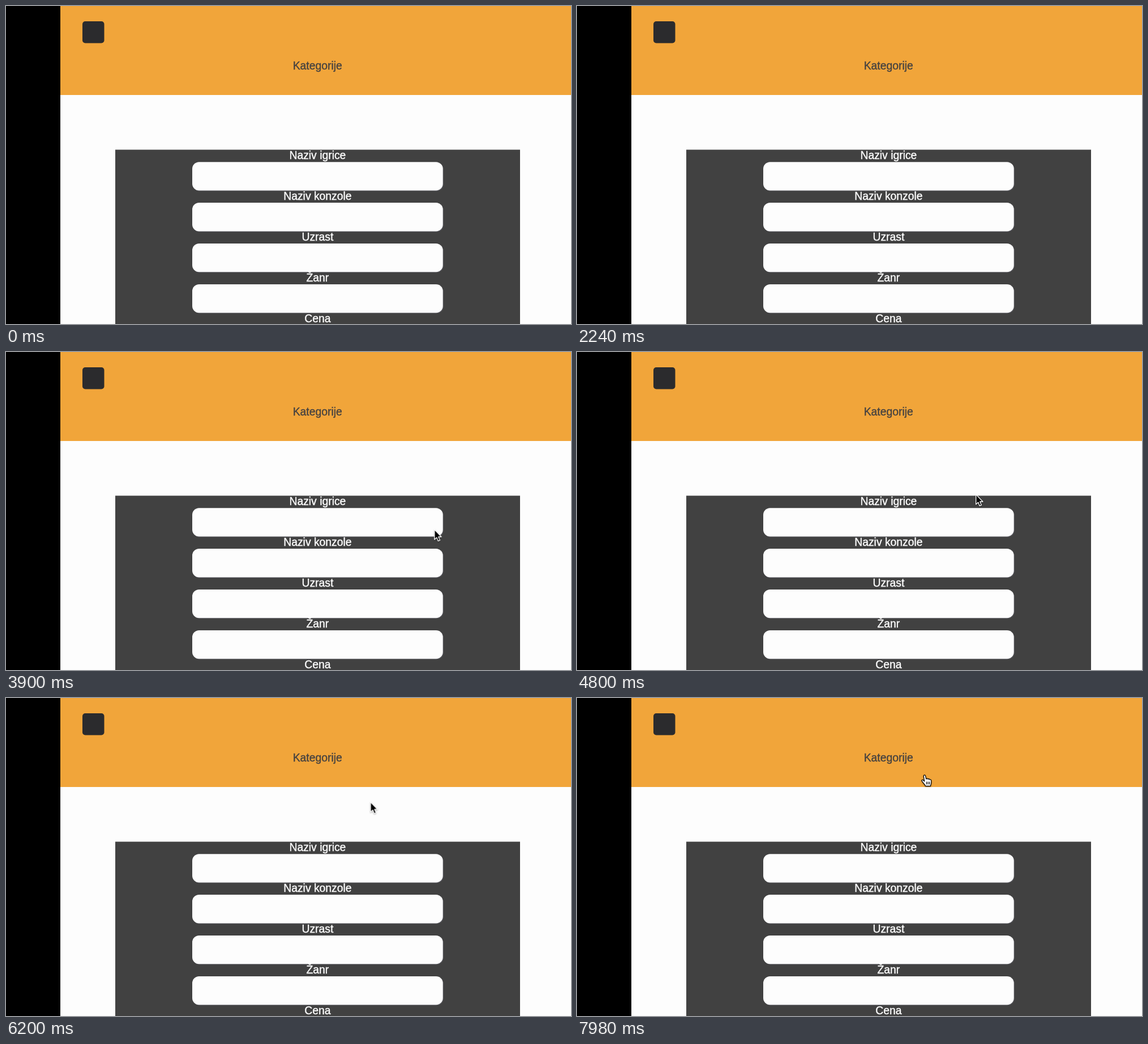
An HTML page for the animation above (8000 ms loop, 998x561 px).

```html
<!DOCTYPE html>
<html lang="sr-Latn">
<head>
<meta charset="utf-8">
<title>Kategorije</title>
<style>
  html, body { margin: 0; width: 100%; height: 100%; overflow: hidden; background: #fdfdfd; }
  svg { display: block; width: 100%; height: 100%; }
  text {
    font: 19.35px "Liberation Sans", Arial, sans-serif;
    text-anchor: middle;
    fill: var(--ink);
    stroke: var(--ink);
    stroke-width: .4;
  }
  .title { --ink: #474340; }
  .label { --ink: #fdfdfd; }
  #pointer { filter: drop-shadow(0 1px 1px rgba(0, 0, 0, .35)); }
</style>
</head>
<body>
<svg viewBox="0 0 998 561">
  <rect width="998" height="157" fill="#f1a53a"/>
  <rect width="96" height="561" fill="#000"/>
  <rect x="135" y="27" width="38.5" height="38.5" rx="5" fill="#2b2b2d"/>
  <text class="title" x="550.2" y="111.7">Kategorije</text>
  <rect x="193" y="253.5" width="715" height="308" fill="#414141"/>
  <g id="form"></g>
  <g id="pointer">
    <path id="arrow" d="M.7 .4V17.8L4.6 14.1 7.2 20.4 10.3 19.1 7.7 13H12.9Z"
      fill="#000" stroke="#fff" stroke-width="1.3" stroke-linejoin="round"/>
    <g id="hand" stroke="#000" stroke-width="1.2" stroke-linejoin="round" stroke-linecap="round">
      <path fill="#fff" d="M-1.8 1.6C-1.5-.6 1-.6 1.5 1.4L2.8 7.2C3.4 5.4 5.8 5.6 6 7.4 6.9 6 8.9 6.5 9 8.2 10.2 7.2 11.7 8 11.7 9.7V14C11.6 16.2 10.6 17 10.4 19.4H1.6C1.2 17.4-1.3 15.5-2.6 13.4L-4.8 10.4C-5.8 8.7-3.7 7.7-2.3 9L-.3 11Z"/>
      <path fill="none" d="M3.4 12.2V16M6 12.2V16M8.6 12.2V16"/>
    </g>
  </g>
</svg>
<script>
  const LOOP = 8000;
  const HAND_AT = 7600;
  const ROW_HEIGHT = 71.9;
  const form = document.getElementById('form');
  const labels = ['Naziv igrice', 'Naziv konzole', 'Uzrast', 'Žanr', 'Cena'];

  function add(tag, attrs, content = '') {
    const node = document.createElementNS('http://www.w3.org/2000/svg', tag);
    for (const [name, value] of Object.entries(attrs)) node.setAttribute(name, value);
    node.textContent = content;
    form.append(node);
  }

  labels.forEach((label, i) => {
    const y = i * ROW_HEIGHT;
    const field = { width: 442.7, height: 50.3, rx: 12 };
    add('rect', { ...field, x: 330, y: 276.2 + y, fill: '#55555b' });
    add('rect', { ...field, x: 329, y: 275.2 + y, fill: '#fdfdfd' });
    add('text', { x: 550.4, y: 270.2 + y, class: 'label' }, label);
  });

  // The pointer enters from below, then slows down towards the menu.
  const stops = [
    { at: 2300, x: 925, y: 575 },
    { at: 2800, x: 820, y: 389 },
    { at: 4800, x: 704, y: 251 },
    { at: 5640, x: 662, y: 211 },
    { at: 6900, x: 620, y: 149 },
    { at: 7980, x: 614, y: 136 }
  ];

  function play(id, frames) {
    const animation = document.getElementById(id).animate(frames, { duration: LOOP, iterations: Infinity });
    animation.startTime = document.timeline.currentTime ?? 0;
  }

  const swap = (before, after) => [
    { opacity: before, offset: 0 },
    { opacity: before, offset: HAND_AT / LOOP },
    { opacity: after, offset: HAND_AT / LOOP },
    { opacity: after, offset: 1 }
  ];

  const held = [{ ...stops[0], at: 0 }, ...stops, { ...stops.at(-1), at: LOOP }];
  play('pointer', held.map(({ at, x, y }) => ({ offset: at / LOOP, transform: `translate(${x}px, ${y}px)` })));
  play('arrow', swap(1, 0));
  play('hand', swap(0, 1));
</script>
</body>
</html>
```
